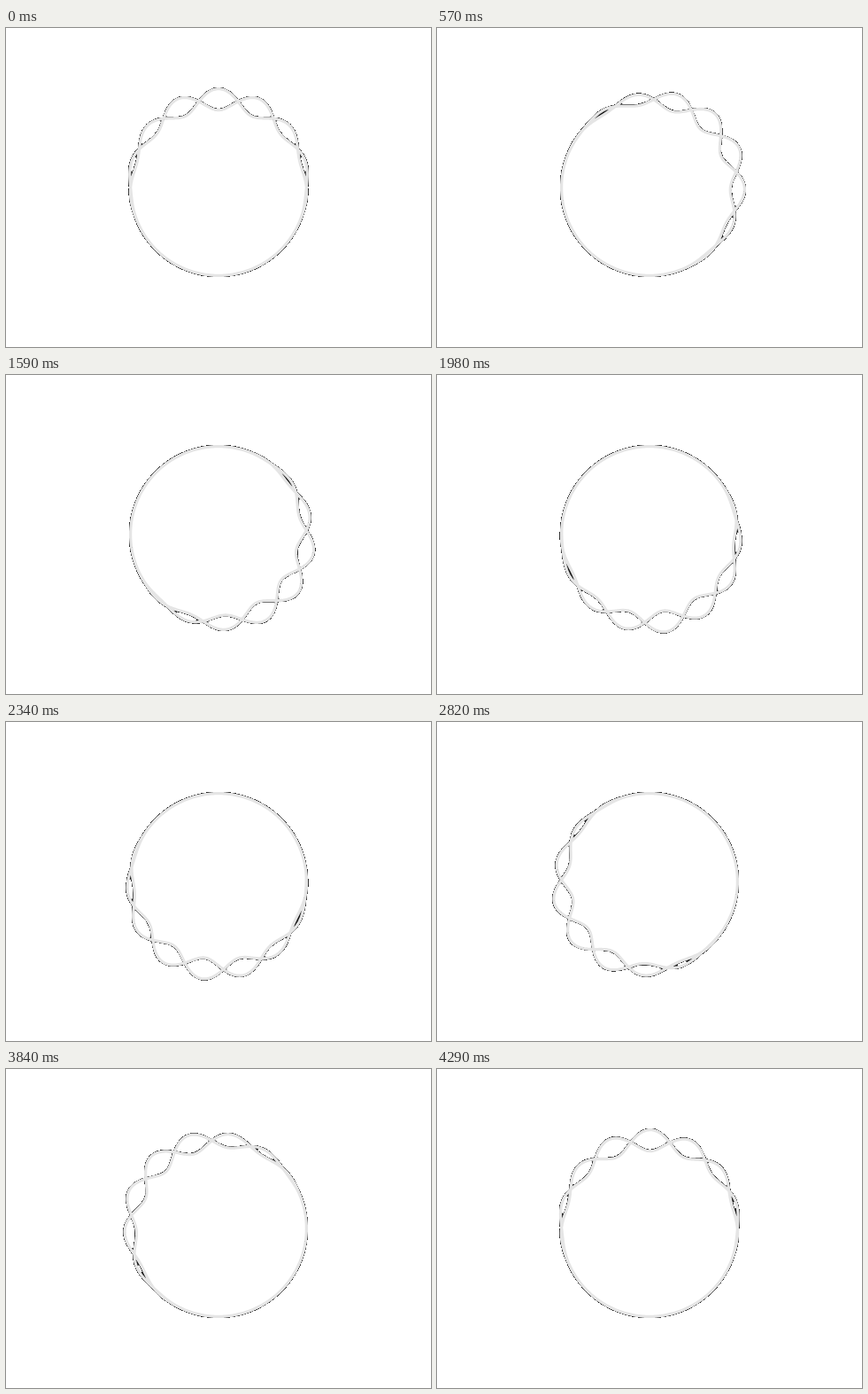
These frames come from a looping animation (480x360 px, 4.32 s). An HTML page:

```html
<!DOCTYPE html>
<html lang="en">
<head>
<meta charset="utf-8">
<title>Braided ring</title>
<style>
  html, body { margin: 0; width: 100%; height: 100%; overflow: hidden; background: #fff; }
  svg { display: block; width: 100vw; height: 100vh; }
  path { fill: none; stroke-linejoin: round; }
  #edge { stroke: #000; stroke-width: 3; shape-rendering: crispEdges; }
  #line { stroke: #e5e5e5; stroke-width: 3.3; }
  #gaps { fill: #111; }
</style>
</head>
<body>
<svg viewBox="0 0 480 360">
  <path id="gaps"/>
  <path id="edge"/>
  <path id="line"/>
</svg>
<script>
const LOOP = 4320, STEP = 30;
const CX = 240, CY = 180, RADIUS = 99.4, AMPLITUDE = 12;
const EDGE_SHIFT = 0.5; // the dark rim shows on the outer side only
const WAVES = 7, DRIFT = -3 * Math.PI;
const SPREAD = 115 * Math.PI / 180;
const SAMPLES = 540, NARROW = 5.2;
const TAU = 2 * Math.PI;

const [gaps, edge, line] = document.querySelectorAll('path');

const point = (angle, r) =>
  (CX + r * Math.sin(angle)).toFixed(2) + ' ' + (CY - r * Math.cos(angle)).toFixed(2);
const polygon = points => 'M' + points.join('L') + 'Z';

// Raised-cosine bump that travels clockwise around the ring.
function envelope(angle) {
  const d = Math.abs(Math.atan2(Math.sin(angle), Math.cos(angle)));
  return d < SPREAD ? Math.cos(d / SPREAD * Math.PI / 2) ** 2 : 0;
}

function draw(ms) {
  const p = ms / LOOP;
  const angles = Array.from({ length: SAMPLES }, (_, i) => TAU * i / SAMPLES);
  const offsets = angles.map(a =>
    AMPLITUDE * envelope(a - TAU * p) * Math.cos(WAVES * a - DRIFT * p));
  const strand = (radius, sign) =>
    polygon(angles.map((a, i) => point(a, radius + sign * offsets[i])));
  const braid = radius => strand(radius, 1) + strand(radius, -1);

  line.setAttribute('d', braid(RADIUS));
  edge.setAttribute('d', braid(RADIUS + EDGE_SHIFT));

  // Narrow slits between the strands stay dark.
  gaps.setAttribute('d', angles.map((a, i) => {
    const j = (i + 1) % SAMPLES, b = angles[j], u = offsets[i], v = offsets[j];
    const gap = Math.abs(u + v);
    return gap > 1 && gap < NARROW
      ? polygon([point(a, RADIUS + u), point(b, RADIUS + v),
                 point(b, RADIUS - v), point(a, RADIUS - u)])
      : '';
  }).join(''));
}

const start = performance.now();
function tick() {
  const elapsed = (performance.now() - start) % LOOP;
  draw(Math.floor(elapsed / STEP) * STEP);
  requestAnimationFrame(tick);
}
tick();
</script>
</body>
</html>
```
